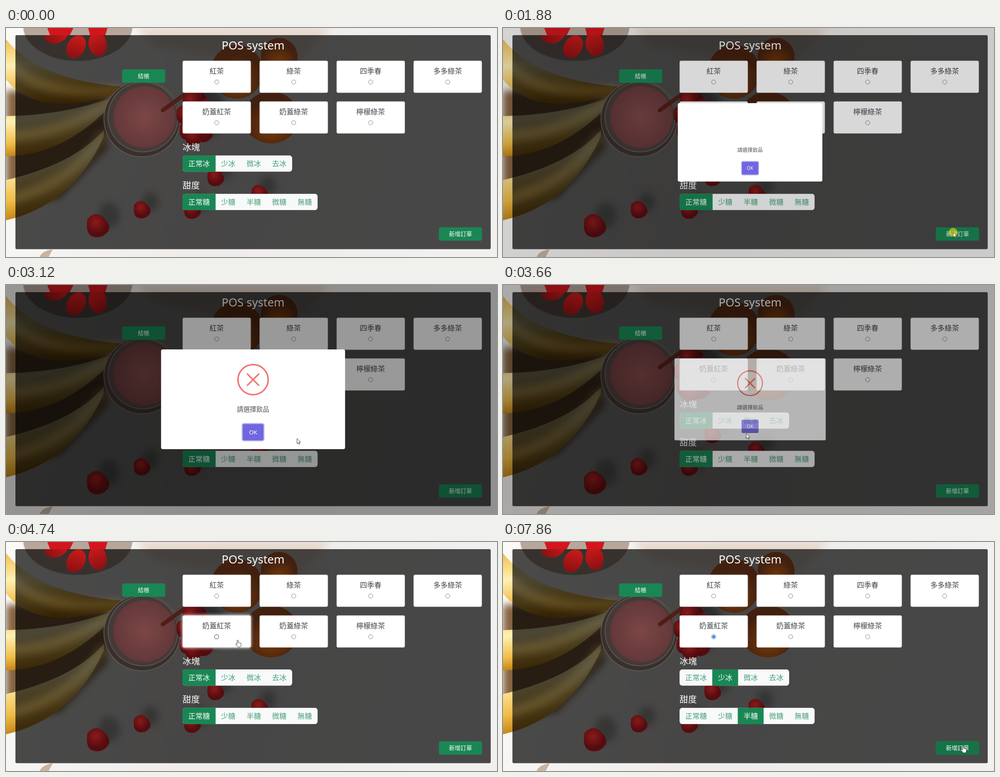
These frames come from a looping animation (1093x512 px, 8 s). An HTML page:

```html
<!DOCTYPE html>
<html lang="zh-Hant">
<head>
<meta charset="utf-8">
<title>POS system</title>
<style>
  html, body { margin: 0; width: 100%; height: 100%; overflow: hidden; background: #f3f2f1; }
  svg { display: block; width: 1093px; height: 512px; }
  text { font-family: "Noto Sans CJK TC", "Noto Sans CJK", "Noto Sans", sans-serif; text-anchor: middle; }
  .latin { font-family: "Noto Sans", "Open Sans", sans-serif; }
</style>
</head>
<body>
<svg viewBox="0 0 1093 512" xmlns="http://www.w3.org/2000/svg">
  <defs>
    <linearGradient id="table" x2="1" y2=".15">
      <stop stop-color="#fbfaf8"/><stop offset=".5" stop-color="#efecea"/><stop offset="1" stop-color="#f1f0ef"/>
    </linearGradient>
    <linearGradient id="banana" x2=".25" y2="1">
      <stop stop-color="#f0c050"/><stop offset=".4" stop-color="#fff0b4"/>
      <stop offset=".75" stop-color="#f0bc48"/><stop offset="1" stop-color="#b8780c"/>
    </linearGradient>
    <radialGradient id="smoothie"><stop stop-color="#7c4645"/><stop offset="1" stop-color="#64383a"/></radialGradient>
    <radialGradient id="orange" cy=".7"><stop stop-color="#74390a"/><stop offset="1" stop-color="#42200f"/></radialGradient>
    <radialGradient id="berry" cx=".4" cy=".35"><stop stop-color="#8a1a1c"/><stop offset="1" stop-color="#560c0f"/></radialGradient>
    <linearGradient id="strawberry" y2="1" x2=".2"><stop stop-color="#cf1c1a"/><stop offset="1" stop-color="#8f1113"/></linearGradient>
    <filter id="soft" x="-40%" y="-40%" width="180%" height="180%"><feGaussianBlur stdDeviation="8"/></filter>
    <filter id="glow" x="-20%" y="-30%" width="140%" height="160%"><feGaussianBlur stdDeviation="3.6"/></filter>
    <clipPath id="inside"><rect x="21" y="16" width="1058" height="479" rx="3"/></clipPath>
  </defs>
  <g id="photo">
    <rect width="1093" height="512" fill="url(#table)"/>
    <path d="M290 0H722L640 90 330 40Z" fill="#e6d8cc" filter="url(#soft)"/>
    <path d="M0 140 230 140 225 270 120 380 0 400Z" fill="#85643f" filter="url(#soft)"/>
    <path d="M75 512Q80 498 104 495L95 512Z" fill="#c9b4a2"/>
    <ellipse cx="160" cy="-4" rx="123" ry="79" fill="#b9a69b" stroke="#f4efea" stroke-width="3"/>
    <path d="M92 0H150L142 16H98ZM183 0H226L221 16H187Z" fill="#d3161d"/>
  </g>
  <rect x="21" y="16" width="1058" height="478.6" rx="3" fill-opacity=".7"/>
  <g id="food" clip-path="url(#inside)"></g>
  <g id="ui"></g>
</svg>
<script>
const LOOP = 8000, GREEN = '#198754', OPEN = 1857, CLOSE = 3627;
const [photo, food, ui] = ['photo', 'food', 'ui'].map(id => document.getElementById(id));

function add(parent, tag, attrs = {}, label) {
  const el = document.createElementNS('http://www.w3.org/2000/svg', tag);
  for (const k in attrs) el.setAttribute(k, attrs[k]);
  if (label) el.textContent = label;
  return parent.appendChild(el);
}
const box = (p, x, y, width, height, rx, fill, more) => add(p, 'rect', { x, y, width, height, rx, fill, ...more });
const oval = (p, cx, cy, rx, ry, fill, more) => add(p, 'ellipse', { cx, cy, rx, ry, fill, ...more });
const disc = (p, x, y, r, fill, more) => oval(p, x, y, r, r, fill, more);
const word = (p, x, cy, size, fill, label, more) =>
  add(p, 'text', { x, y: cy + size * .38, 'font-size': size, fill, ...more }, label);
const show = (el, amount) => el.setAttribute('opacity', +amount);
const place = (el, transform) => el.setAttribute('transform', transform);

// Timing: progress in a span, the CSS "ease" curve, and keyframes eased one by one
const part = (t, from, ms) => Math.min(1, Math.max(0, (t - from) / ms));
function ease(p) {
  let lo = 0, hi = 1;
  for (let i = 0; i < 14; i++) {
    const s = (lo + hi) / 2, x = .75 * s * (1 - s) + s ** 3;
    if (x < p) lo = s; else hi = s;
  }
  return .3 * lo * (1 - lo) ** 2 + 3 * lo * lo * (1 - lo) + lo ** 3;
}
const mix = (a, b, p) => a + (b - a) * p;
function track(p, keys) {
  const i = keys.findIndex(([at]) => at > p);
  if (i < 1) return keys[i ? keys.length - 1 : 0][1];
  const [a, va] = keys[i - 1], [b, vb] = keys[i];
  return mix(va, vb, ease((p - a) / (b - a)));
}

// Fruit
function banana(x0, y0, cx, cy, x1, y1, w = 45) {
  add(photo, 'path', { fill: 'url(#banana)',
    d: `M${x0} ${y0 - w}Q${cx} ${cy - w} ${x1} ${y1 - 7}V${y1 + 7}Q${cx} ${cy + w} ${x0} ${y0 + w}Z` });
  add(food, 'path', { d: `M${x0} ${y0}Q${cx} ${cy} ${x1} ${y1}`, fill: 'none', stroke: '#e8c878',
    'stroke-width': 24, opacity: .17, filter: 'url(#soft)' });
}
banana(0, 385, 150, 350, 218, 235);
banana(0, 242, 130, 240, 238, 162);
banana(0, 70, 70, 160, 256, 138);

for (const [x, y, turn] of [[112, 14, 70], [156, 42, 30], [204, 36, -10]])
  oval(food, x, y, 20, 27, 'url(#strawberry)', { transform: `rotate(${turn} ${x} ${y})` });

const rim = { stroke: '#625a54', 'stroke-width': 1.6 };
disc(food, 303, 203, 85, '#38302d', rim);
disc(food, 305, 199, 78, '#453a37', rim);
disc(food, 308, 199, 69, 'url(#smoothie)');
add(food, 'path', { d: 'M349 184 404 144', stroke: '#4f1e18', 'stroke-width': 9, 'stroke-linecap': 'round' });
oval(food, 514, 98, 58, 60, 'url(#orange)');
oval(food, 608, 64, 41, 42, 'url(#orange)');
oval(food, 590, 200, 62, 58, 'url(#orange)');

function berry(x, y, r = 19) {
  oval(food, x + r, y - r, r, r * 1.2, '#000', { opacity: .25, filter: 'url(#soft)' });
  add(food, 'path', { d: 'M-.9-.6Q-.2-1.4.5-.7T.8.5Q.3 1.1-.4.9T-.9-.6Z', fill: 'url(#berry)',
    transform: `translate(${x} ${y}) scale(${r * 1.1})` });
}
for (const [x, y] of [[205, 443], [303, 407], [467, 335], [415, 408], [565, 371]]) berry(x, y, x < 300 ? 24 : 18);
for (let i = 0; i < 9; i++) berry(425 + 26 * Math.cos(i * 2.4), 202 + 42 * Math.sin(i * 2.4));

// Interface; `links` holds every area where the pointer becomes a hand
const links = [];
function link(x, y, w, h) {
  const area = { has: p => p.x > x && p.x < x + w && p.y > y && p.y < y + h };
  links.push(area);
  return area;
}

word(ui, 550, 38.4, 25.4, '#fff', 'POS system', { class: 'latin' });

function button(x, y, label) {
  const area = link(x, y, 96, 30);
  box(ui, x, y, 96, 30, 4, GREEN);
  area.mark = box(ui, x, y, 96, 30, 4, '#157347');
  word(ui, x + 48, y + 15, 12.8, '#fff', label);
}
button(258.4, 92.4, '結帳');
button(963.6, 445.4, '新增訂單');

let picked;
['紅茶', '綠茶', '四季春', '多多綠茶', '奶蓋紅茶', '奶蓋綠茶', '檸檬綠茶'].forEach((name, i) => {
  const x = 393 + i % 4 * 171.4, y = i < 4 ? 73 : 164, cx = x + 76, cy = y + 47.8;
  const area = link(x, y, 152, 72);
  area.mark = box(ui, x, y, 152, 72, 3, '#fff', { filter: 'url(#glow)' });
  box(ui, x + .4, y + .4, 151.4, 71.2, 3, '#fff', { stroke: '#dfdfdf', 'stroke-width': .8 });
  word(ui, cx, y + 22.6, 16, '#212529', name, { 'font-weight': 300, 'fill-opacity': .85 });
  const ring = { stroke: '#767676', 'stroke-width': .9 };
  disc(ui, cx, cy, 4.7, '#fff', ring);
  area.ring = disc(ui, cx, cy, 4.7, '#fff', { ...ring, stroke: '#3f3f3f' });
  if (name !== '奶蓋紅茶') return;
  picked = add(ui, 'g');
  disc(picked, cx, cy, 4.7, '#fff', { ...ring, stroke: '#2374d8' });
  disc(picked, cx, cy, 2.9, '#2374d8');
});

// The choice moves from the first item to item `pick` at time `at`
function options(y, title, names, pick, at) {
  const width = 73.6 + (names.length - 1) * 56.8, id = 'row' + y;
  link(393, y, width, 36.6);
  word(ui, 412.2, y - 18.4, 19.2, '#fff', title);
  box(add(ui, 'clipPath', { id }), 393, y, width, 36.6, 6.4, '#fff');
  const g = add(ui, 'g', { 'clip-path': `url(#${id})` });
  box(g, 393, y, width, 36.6, 0, '#f8f9fa');
  const marks = names.map((name, i) => {
    const x = i ? 409 + i * 56.8 : 393, w = i ? 57.6 : 73.6;
    const label = (p, fill, more) => word(p, x + w / 2, y + 18, 16, fill, name, { 'font-weight': 300, ...more });
    label(g, GREEN, { 'fill-opacity': .8 });
    const mark = add(g, 'g');
    box(mark, x, y, w, 36.6, 0, GREEN);
    label(mark, '#fff');
    return mark;
  });
  return t => marks.forEach((mark, i) => {
    const p = ease(part(t, at, 130));
    show(mark, i === pick ? p : i ? 0 : 1 - p);
  });
}
const rows = [
  options(284.8, '冰塊', ['正常冰', '少冰', '微冰', '去冰'], 1, 5940),
  options(370.6, '甜度', ['正常糖', '少糖', '半糖', '微糖', '無糖'], 2, 6950)
];

// Alert dialog, drawn around its centre
const shade = box(ui, 0, 0, 1093, 512, 0, '#000'), dialog = add(ui, 'g');
const red = { stroke: '#f27474', 'stroke-width': 3.4, 'stroke-linecap': 'round' };
box(dialog, -204.8, -111.5, 409.6, 223, 4, '#fff');
const icon = add(dialog, 'g');
disc(icon, 0, 0, 33.6, 'none', red);
const cross = add(icon, 'path', { d: 'M-12.5-12.5 12.5 12.5M12.5-12.5-12.5 12.5', ...red });
word(dialog, 0, 22.3, 14.4, '#545454', '請選擇飲品');
const focus = box(dialog, -25.4, 53, 50.8, 41, 5.4, '#b8b3f0');
box(dialog, -23, 55.4, 46, 36.2, 3.2, '#7066e0');
word(dialog, 0, 73.2, 13, '#fff', 'OK', { class: 'latin' });
const okArea = { has: p => Math.abs(p.x - 550) < 23 && Math.abs(p.y - 329) < 18 };

function drawDialog(t) {
  const out = ease(part(t, CLOSE, 150)), turn = ease(part(t, OPEN, 500)), draw = part(t, OPEN, 500);
  const scale = track(part(t, OPEN, 300), [[0, .7], [.45, 1.05], [.8, .95], [1, 1]]) * (1 - out / 2);
  show(shade, .4 * (ease(part(t, OPEN, 100)) - ease(part(t, CLOSE + 18, 100))));
  show(dialog, t < OPEN ? 0 : 1 - out);
  place(dialog, `translate(550 255.6) scale(${scale})`);
  place(icon, `translate(0 -44) scale(1 ${Math.cos((1 - turn) * Math.PI / 1.8)})`);
  show(icon, turn);
  show(cross, track(draw, [[.5, 0], [.8, 1]]));
  place(cross, `translate(0 ${track(draw, [[.5, 20], [.8, -4], [1, 0]])}) scale(${track(draw, [[.5, .4], [.8, 1.15], [1, 1]])})`);
  show(focus, t < CLOSE);
}

// Pointer: moves as [start, end, x, y]
const moves = [
  [940, 1200, 1002, 456.5], [2900, 3240, 509, 299], [3240, 3360, 541.5, 332], [4270, 4700, 515.7, 219.3],
  [4870, 5000, 505, 214], [5550, 5870, 498, 305.5], [6340, 6700, 561.3, 398], [7290, 7720, 1024, 456]
];
const clicks = [1820, 3590, 5480, 5870, 6880];
const pointer = add(ui, 'g');
const spot = disc(pointer, 0, .5, 10, 'rgba(255,235,0,.55)');
const line = { fill: '#fff', stroke: '#111', 'stroke-width': .8, 'stroke-linejoin': 'round' };
const arrow = add(pointer, 'path', { d: 'M0 0V11.5L2.7 9 4.5 13 6.3 12.2 4.6 8.3H8.2Z', ...line });
const hand = add(pointer, 'path', {
  d: 'M-1.3 8.8V1.3a1.3 1.3 0 0 1 2.6 0V5.6q2-.8 2.3.5 2-.6 2.2.6 1.8-.3 1.8 1.2V11q0 4-2.6 4.5H1.4Q-.5 15-4 10q-.8-1.6.6-2 1-.2 2.1 1.4Z', ...line
});

function drawPointer(t) {
  const at = { x: 1040, y: 490 };
  for (const [from, to, x, y] of moves) {
    const p = part(t, from, to - from), s = p * p * (3 - 2 * p);
    at.x = mix(at.x, x, s);
    at.y = mix(at.y, y, s);
  }
  const blocked = t > OPEN && t < CLOSE + 118;
  let over = blocked && t < CLOSE && okArea.has(at);
  for (const area of links) {
    const hit = !blocked && area.has(at);
    over = over || hit;
    if (area.mark) show(area.mark, hit);
    if (area.ring) show(area.ring, hit);
  }
  place(pointer, `translate(${at.x} ${at.y})`);
  show(pointer, t >= 940);
  show(spot, clicks.some(c => t >= c && t < c + 68));
  show(hand, over);
  show(arrow, !over);
}

function frame(now) {
  const t = (now - start) % LOOP;
  rows.forEach(draw => draw(t));
  show(picked, t >= 5550);
  drawDialog(t);
  drawPointer(t);
  requestAnimationFrame(() => frame(performance.now()));
}
const start = performance.now();
frame(start);
</script>
</body>
</html>
```
